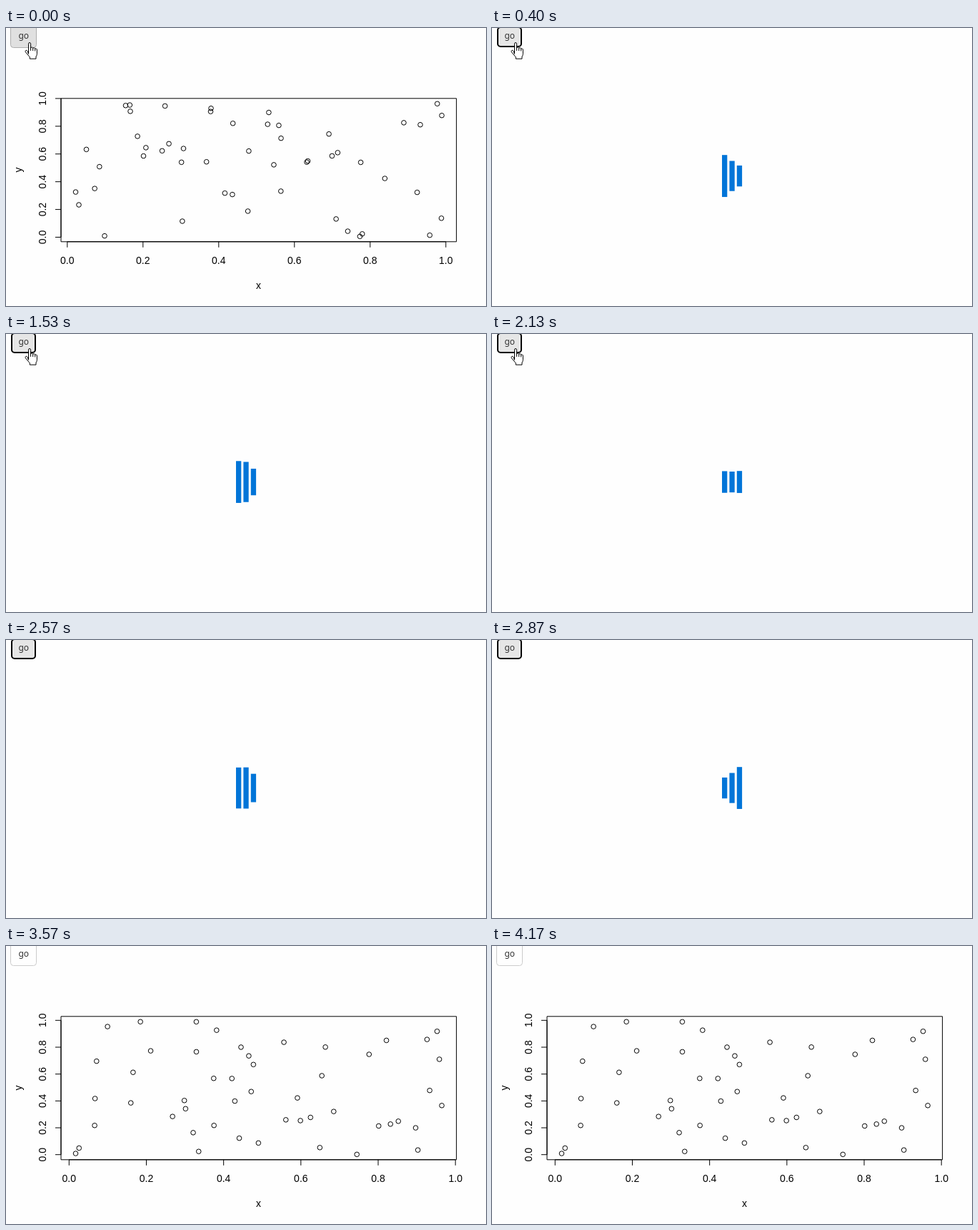
Animation of 672x390 px, one loop 4.21 s. Source, as an HTML page:

```html
<!DOCTYPE html>
<html lang="en">
<head>
<meta charset="utf-8">
<title>Scatter plot with loader</title>
<style>
  html, body { margin: 0; width: 100%; height: 100%; overflow: hidden; background: #fefefe; }
  svg { display: block; width: 672px; height: 390px; }
  .plot { font: 14px "Liberation Sans", Arial, sans-serif; text-anchor: middle; fill: #000; }
  .line { fill: none; stroke: #000; stroke-width: 1; }
  .label { font: 12px "Noto Sans", "Open Sans", sans-serif; text-anchor: middle; fill: #333; }
  .hover { fill: #e0e0e0; stroke: #adadad; }
  .focus { fill: #e6e6e6; stroke: #000; stroke-width: 2; }
  .idle { fill: #fefefe; stroke: #ccc; }
</style>
</head>
<body>
<svg id="stage" viewBox="0 0 672 390">
  <rect id="face" rx="4"/>
  <text class="label" x="24.7" y="15">go</text>
  <g id="loader" fill="#0275d8"></g>
  <g id="cursor" stroke="#000" stroke-width="1" stroke-linejoin="round" stroke-linecap="round">
    <path fill="#fff" d="M31.5 36V22.3Q31.5 20.5 33 20.5T34.6 22.3V28.2Q35.2 26.6 36.5 27T37.7 28.6Q38.4 27.4 39.6 27.8T40.7 29.4Q41.5 28.5 42.5 29T43.4 31V36.5Q43.3 38.5 42 40V43.2H33.3V40.8L27.4 33.8Q26.6 32.2 27.8 31.4T30 32.2Z"/>
    <path fill="none" d="M34.6 28V31.5M37.7 28.6V31.7M40.7 29.6V32"/>
  </g>
</svg>
<script>
const LOOP = 4210, FPS = 30;
const FOCUS_AT = 200, LOAD_AT = 370, DONE_AT = 3430;
const LEAVE_FROM = 2270, LEAVE_TO = 2500;
const BOX = { left: 77, top: 98.8, right: 630.6, bottom: 299.8 };
const POINTS = 50;

const stage = document.getElementById("stage");
const face = document.getElementById("face");
const loader = document.getElementById("loader");
const cursor = document.getElementById("cursor");

function add(parent, tag, attrs, text) {
  const node = document.createElementNS("http://www.w3.org/2000/svg", tag);
  setAttrs(node, attrs);
  if (text) node.textContent = text;
  return parent.appendChild(node);
}

function setAttrs(node, attrs) {
  for (const key in attrs) node.setAttribute(key, attrs[key]);
}

function show(node, visible) {
  node.style.display = visible ? "" : "none";
}

function seededRandom(seed) {
  return () => {
    seed = (seed + 0x6d2b79f5) | 0;
    let h = Math.imul(seed ^ (seed >>> 15), 1 | seed);
    h = (h + Math.imul(h ^ (h >>> 7), 61 | h)) ^ h;
    return ((h ^ (h >>> 14)) >>> 0) / 2 ** 32;
  };
}

// Uniform samples whose extremes sit 4 % of their range inside the box edges.
function spread(random, from, to) {
  const values = Array.from({ length: POINTS }, random);
  const min = Math.min(...values), range = Math.max(...values) - min;
  return values.map(v => from + (to - from) * ((v - min) / range + 0.04) / 1.08);
}

// Axis ranges are the pixel positions of 0.0 and 1.0.
function makePlot(seed, [x0, x1], [y0, y1]) {
  const { left, top, right, bottom } = BOX;
  const plot = add(stage, "g", { class: "plot" });
  const line = d => add(plot, "path", { class: "line", d });
  const text = (x, y, s, turn = 0) =>
    add(plot, "text", { transform: `translate(${x} ${y}) rotate(${turn})` }, s);

  line(`M${left} ${top}H${right}V${bottom}H${left}Z`);
  line(`M${x0} ${bottom}H${x1}M${left} ${y0}V${y1}`);
  for (let i = 0; i <= 5; i++) {
    const x = x0 + (x1 - x0) * i / 5;
    const y = y0 + (y1 - y0) * i / 5;
    const value = (i / 5).toFixed(1);
    line(`M${x} ${bottom}v8M${left} ${y}h-8`);
    text(x, 331, value);
    text(55.7, y, value, -90);
  }
  text(353.5, 366, "x");
  text(21.6, 199, "y", -90);

  const random = seededRandom(seed);
  const xs = spread(random, left, right);
  const ys = spread(random, bottom, top);
  xs.forEach((cx, i) => add(plot, "circle", { class: "line", cx, cy: ys[i], r: 3.3 }));
  return plot;
}

const before = makePlot(7, [85.8, 615.8], [293.5, 98.9]);
const after = makePlot(21, [88.3, 629.2], [292.7, 104.3]);
stage.appendChild(cursor);

const bars = [0, 1, 2].map(i => add(loader, "rect", { x: 322 + 10.4 * i, width: 7.3 }));

// CSS ease-in-out: cubic-bezier(.42, 0, .58, 1)
function easeInOut(x) {
  let lo = 0, hi = 1;
  for (let i = 0; i < 20; i++) {
    const s = (lo + hi) / 2;
    const bx = 3 * s * (1 - s) * (1 - s) * 0.42 + 3 * s * s * (1 - s) * 0.58 + s * s * s;
    if (bx < x) lo = s; else hi = s;
  }
  return lo * lo * (3 - 2 * lo);
}

// Rise until 40 % of the cycle, fall until 80 %, then rest.
function stretch(phase) {
  const distance = Math.abs(phase - 0.4) / 0.4;
  return distance < 1 ? easeInOut(1 - distance) : 0;
}

function drawLoader(t) {
  bars.forEach((bar, i) => {
    const phase = ((t - 378) / 1012 + 0.16 * (2 - i) + 1) % 1;
    const half = 14.6 + 15.5 * stretch(phase);
    setAttrs(bar, { y: 207.6 - half, height: 2 * half });
  });
}

function drawButton(t) {
  const focused = t >= FOCUS_AT && t < DONE_AT;
  const state = focused ? "focus" : t < FOCUS_AT ? "hover" : "idle";
  const shape = focused
    ? { x: 8, y: -1, width: 33, height: 27 }
    : { x: 6.5, y: -5, width: 36, height: 32.5 };
  setAttrs(face, { class: state, ...shape });
}

function render(time) {
  const clock = time % LOOP;
  const t = Math.floor((clock + 5) * FPS / 1000) * 1000 / FPS;
  const loading = t >= LOAD_AT && t < DONE_AT;
  show(before, t < LOAD_AT);
  show(after, t >= DONE_AT);
  show(loader, loading);
  if (loading) drawLoader(t);
  drawButton(t);
  show(cursor, t < LEAVE_TO);
  const leave = Math.max(0, (t - LEAVE_FROM) / (LEAVE_TO - LEAVE_FROM));
  cursor.setAttribute("transform", `translate(${-46 * leave * leave} ${6 * leave})`);
}

let start;
function tick(now) {
  start ??= now;
  render(now - start);
  requestAnimationFrame(tick);
}
render(0);
requestAnimationFrame(tick);
</script>
</body>
</html>
```
